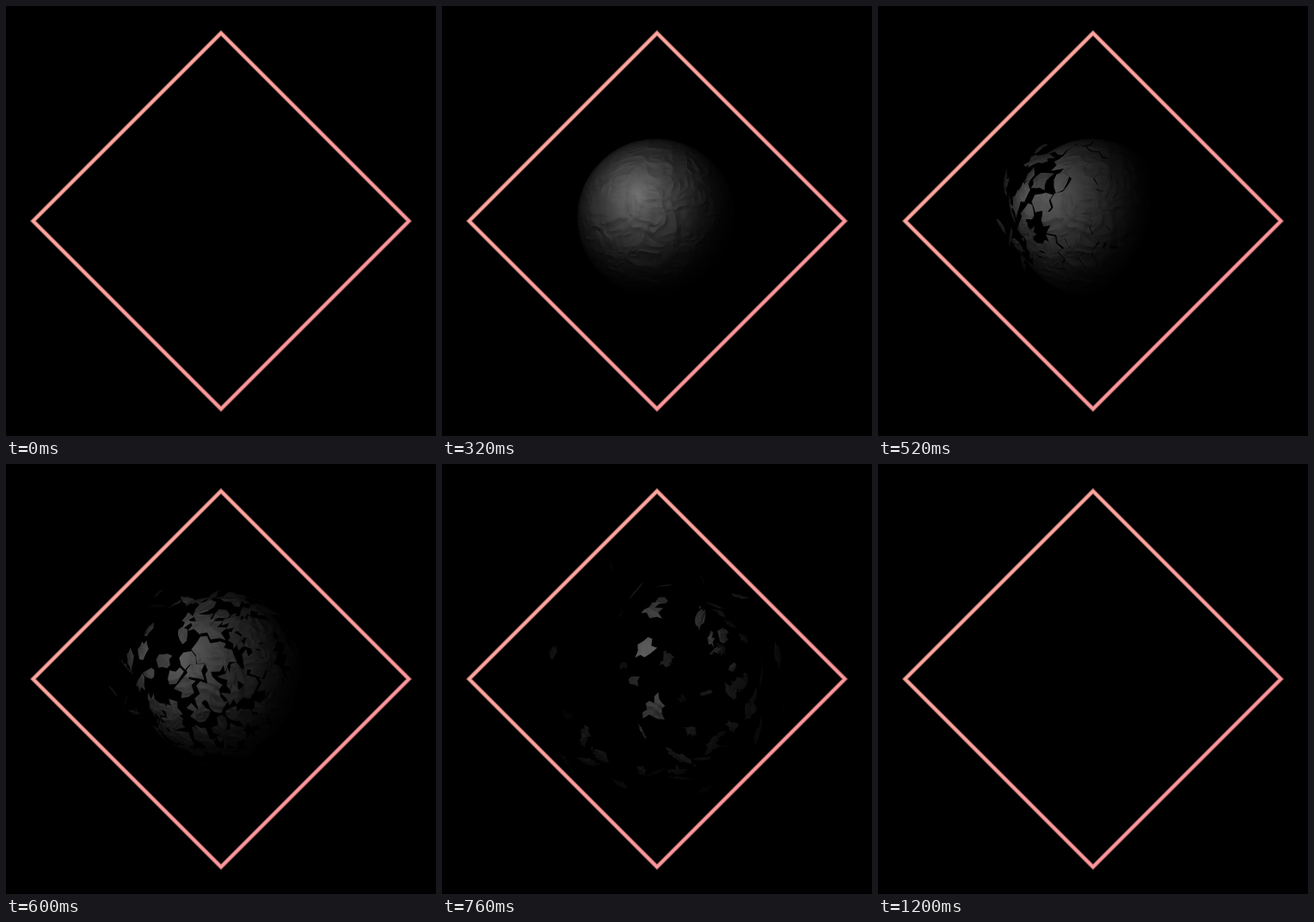
An HTML page with a canvas for the animation above (1.24 s loop, 500x500 px).

```html
<!DOCTYPE html>
<html lang="en">
<head>
<meta charset="utf-8">
<title>Shattering sphere</title>
<style>
html, body { margin: 0; width: 100%; height: 100%; overflow: hidden; background: #000; }
canvas { display: block; width: 100vmin; height: 100vmin; }
</style>
</head>
<body>
<canvas id="stage" width="500" height="500"></canvas>
<script>
const ctx = document.getElementById('stage').getContext('2d');
const LOOP = 1240, STEP = 40;
const CX = 249, CY = 246, R = 91, SIZE = 2 * R + 2;
const SHARDS = 100, CELL = 0.105;

let seed = 41;
const rnd = () => {
  seed = (seed * 1664525 + 1013904223) >>> 0;
  return seed / 4294967296;
};
const spread = w => w * (rnd() - 0.5);
const clamp = v => Math.min(1, Math.max(0, v));
const mix = (a, b, p) => a + (b - a) * p;
const ease = p => p * p * (3 - 2 * p);
const ramp = (t, a, b) => ease(clamp((t - a) / (b - a)));

// Rock surface
const hash = (x, y) => {
  const s = Math.sin(x * 127.1 + y * 311.7) * 43758.5453;
  return s - Math.floor(s);
};
function noise(x, y) {
  const i = Math.floor(x), j = Math.floor(y);
  const u = ease(x - i), v = ease(y - j);
  return mix(mix(hash(i, j), hash(i + 1, j), u),
             mix(hash(i, j + 1), hash(i + 1, j + 1), u), v);
}
function height(x, y) {
  const wx = x + 12 * noise(x / 20, y / 20), wy = y + 12 * noise(x / 20 + 40, y / 20);
  const ridge = s => 1 - Math.abs(2 * noise(wx / s, wy / (s * 0.8)) - 1);
  return 2.8 * ridge(18) + 1.1 * ridge(9);
}

function makeRock() {
  const c = document.createElement('canvas');
  c.width = c.height = SIZE;
  const g = c.getContext('2d'), img = g.createImageData(SIZE, SIZE);
  for (let y = 0; y < SIZE; y++) for (let x = 0; x < SIZE; x++) {
    const nx = (x - R) / R, ny = (y - R) / R;
    const nz = Math.sqrt(Math.max(0, 1 - nx * nx - ny * ny));
    // Equal-angle coordinates squeeze the relief towards the rim
    const r = Math.hypot(nx, ny) || 1e-6, k = R * Math.asin(Math.min(1, r)) / r;
    const u = nx * k, v = ny * k, h = height(u, v);
    const bx = nx - 0.85 * (height(u + 1, v) - h);
    const by = ny - 0.85 * (height(u, v + 1) - h);
    const lit = clamp((-0.25 * bx - 0.3 * by + 0.92 * nz) / Math.hypot(bx, by, nz));
    const grey = 24 + 90 * Math.pow(lit, 1.7);
    const o = 4 * (y * SIZE + x);
    img.data.fill(grey, o, o + 3);
    img.data[o + 3] = 255;
  }
  g.putImageData(img, 0, 0);
  return ctx.createPattern(c, 'repeat');
}

// Points on the dome, given as angles from its pole
function dome(u, v) {
  const th = Math.hypot(u, v) || 1e-6;
  const t = Math.min(th, Math.PI / 2), k = Math.sin(t) / th;
  return [u * k, v * k, Math.cos(t)];
}

// Shards come together at random and break away from left to right
function makeShard(i) {
  const a = i * 2.39996, th = Math.acos(1 - (i + 0.5) / SHARDS);
  const n = dome(th * Math.cos(a), th * Math.sin(a));
  const leave = 290 + 240 * Math.sqrt((n[0] + 1) / 2) + 150 * rnd();
  return {
    n, leave,
    path: new Path2D(),
    x: n[0] * R,
    y: n[1] * R,
    size: 0.65 + Math.pow(rnd(), 3),
    arrive: 130 + 190 * rnd(),
    end: leave + 170 + 330 * Math.pow(rnd(), 2),
    dx: 32 * n[0] + 7 + spread(16),
    dy: 20 * n[1] + 3 + spread(16),
    axis: rnd() * Math.PI,
    spin: spread(1.2)
  };
}
const shards = Array.from({ length: SHARDS }, (_, i) => makeShard(i));

function addTriangle(pts) {
  const mid = n => (pts[0][n] + pts[1][n] + pts[2][n]) / 3;
  if (Math.hypot(mid(0), mid(1)) > Math.PI / 2) return;
  const m = dome(mid(0), mid(1));
  let best, min = Infinity;
  for (const s of shards) {
    const d = Math.hypot(m[0] - s.n[0], m[1] - s.n[1], m[2] - s.n[2]) / s.size;
    if (d < min) { min = d; best = s; }
  }
  pts.forEach(([u, v], i) => {
    const p = dome(u, v);
    best.path[i ? 'lineTo' : 'moveTo'](R + p[0] * R, R + p[1] * R);
  });
  best.path.closePath();
}

function meshPoint(i, j) {
  const x = i - Math.floor(j / 2) + j / 2;
  return [(x + 0.5 * hash(i, j)) * CELL, (j * 0.866 + 0.5 * hash(j, i + 60)) * CELL];
}
for (let j = -20; j < 20; j++) for (let i = -20; i < 20; i++) {
  const odd = Math.abs(j % 2);
  const a = meshPoint(i, j), b = meshPoint(i + 1, j);
  const c = meshPoint(i, j + 1), d = meshPoint(i + 1, j + 1);
  addTriangle(odd ? [a, b, d] : [a, b, c]);
  addTriangle(odd ? [a, d, c] : [b, d, c]);
}

const rock = makeRock();

function drawShard(s, t) {
  const near = clamp((t - s.arrive + 110) / 110);
  if (t < STEP || !near || t >= s.end) return;
  const away = Math.pow(1 - near, 1.7);
  const tau = Math.max(0, t - s.leave), go = Math.pow(tau / 160, 1.7);
  const life = clamp(tau / (s.end - s.leave));
  const turn = s.spin * (tau / 130 + away * 3);
  const size = 1 - 0.6 * life * life;
  ctx.save();
  ctx.globalAlpha = Math.pow(near, 3) * (1 - Math.pow(life, 3));
  ctx.translate(CX + s.x * (1 + 0.3 * away) + s.dx * go,
                CY + s.y * (1 + 0.3 * away) + s.dy * go);
  ctx.rotate(s.axis);
  ctx.scale(size * Math.cos(turn * 1.5), size);
  ctx.rotate(turn - s.axis);
  ctx.translate(-R - s.x, -R - s.y);
  ctx.fillStyle = ctx.strokeStyle = rock;
  ctx.fill(s.path);
  // Hide the seams while the shard rests in place
  if (near === 1 && !tau) {
    ctx.lineWidth = 0.8;
    ctx.stroke(s.path);
  }
  ctx.restore();
}

// The light swings left, then follows the debris to the right
function drawLight(t) {
  const swing = Math.exp(-Math.pow((t - 560) / 180, 2));
  const x = 238 - 65 * swing + 100 * ramp(t, 640, 920);
  const y = 220 + 20 * ramp(t, 600, 760);
  const r = 125 + 125 * ramp(t, 440, 760);
  const g = ctx.createRadialGradient(x, y, 0, x, y, r);
  for (let q = 0; q <= 1; q += 0.125) {
    const c = Math.round(255 * Math.pow(1 - q, 1.2));
    g.addColorStop(q, `rgb(${c},${c},${c})`);
  }
  ctx.globalCompositeOperation = 'multiply';
  ctx.fillStyle = g;
  ctx.fillRect(0, 0, 500, 500);
  ctx.globalCompositeOperation = 'source-over';
}

const edge = ctx.createLinearGradient(140, 140, 360, 360);
edge.addColorStop(0, '#ffa59d');
edge.addColorStop(1, '#fc969a');

const diamond = new Path2D('M250 31.5 468.5 250 250 468.5 31.5 250Z');
function drawDiamond() {
  ctx.strokeStyle = edge;
  ctx.globalAlpha = 0.5;
  ctx.lineWidth = 5.2;
  ctx.stroke(diamond);
  ctx.globalAlpha = 1;
  ctx.lineWidth = 3.4;
  ctx.stroke(diamond);
}

function frame(now) {
  const t = Math.floor((now % LOOP) / STEP) * STEP;
  ctx.fillStyle = '#000';
  ctx.fillRect(0, 0, 500, 500);
  for (const s of shards) drawShard(s, t);
  drawLight(t);
  drawDiamond();
  requestAnimationFrame(frame);
}
requestAnimationFrame(frame);
</script>
</body>
</html>
```
